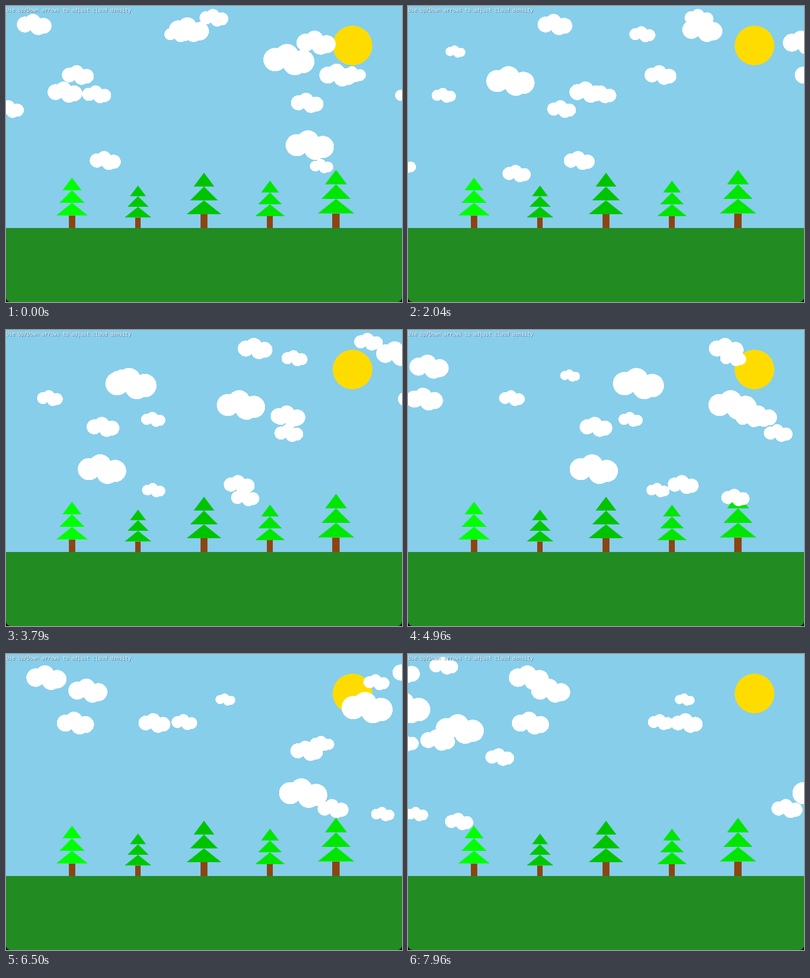
An HTML page with a canvas that plays this animation: 800 px wide and 600 px high, repeating every 8000 ms.

```html
<!DOCTYPE html>
<html lang="en">
<head>
<meta charset="utf-8">
<title>Drifting clouds</title>
<style>
  html, body { margin: 0; width: 100%; height: 100%; overflow: hidden; background: #000; }
  canvas { display: block; }
</style>
</head>
<body>
<canvas id="stage" width="800" height="600"></canvas>
<script>
const ctx = document.getElementById("stage").getContext("2d");
const LOOP = 8000, FRAME = 1000 / 24;
const WIDTH = 800, HEIGHT = 600, HORIZON = 450;
const SPAN = 1000, MARGIN = 100;

// left, top, width, pixels per tick
const clouds = [
  [22, 16, 70, 1.966],
  [329, 23, 81, 1.845],
  [320, 41, 52.5, 1.042],
  [391, 6, 58, 1.376],
  [587, 50, 79, 1.396],
  [520, 77, 103, 3],
  [633, 117, 75, 1.217],
  [675, 122, 52, 1.708],
  [113, 120, 64.5, 2.991],
  [84, 153, 70, 1.985],
  [154, 161, 58.5, 1.707],
  [-22, 191, 58, 2.486],
  [575.5, 176, 66, 2.588],
  [847, 122, 97.5, 2.55],
  [-84.7, 80, 40, 1.316],
  [786, 166, 49, 2.145],
  [565, 252, 97.5, 2.556],
  [614, 310, 47, 2.911],
  [169.3, 294, 62.5, 1.192],
  [884.6, 322, 57, 2.511]
];

// puff centres, in thirds of the puff radius
const puffs = [[0, 0], [3, -1], [5, 1], [7, 0.5]];

// layer height, leaf colour
const trees = [
  [25.5, "#00ff00"],
  [21.5, "#00c800"],
  [28, "#00c300"],
  [24, "#00e600"],
  [29.5, "#00e600"]
];

function rect(x, y, w, h, color) {
  ctx.fillStyle = color;
  ctx.fillRect(x, y, w, h);
}

// hard-edged disc, one row at a time
function disc(cx, cy, r, color) {
  ctx.fillStyle = color;
  for (let y = Math.round(cy - r); y < cy + r; y++) {
    const dy = y + 0.5 - cy;
    if (Math.abs(dy) >= r) continue;
    const half = Math.sqrt(r * r - dy * dy);
    const x = Math.round(cx - half);
    ctx.fillRect(x, y, Math.round(cx + half) - x, 1);
  }
}

function drawGround() {
  rect(0, HORIZON, WIDTH, HEIGHT - HORIZON, "#000");
  ctx.fillStyle = "#228b22";
  ctx.beginPath();
  ctx.roundRect(0, HORIZON, WIDTH, HEIGHT - HORIZON, [0, 0, 9, 9]);
  ctx.fill();
}

function drawTree([h, color], i) {
  const x = WIDTH / 6 * (i + 1);
  const left = Math.round(x - h / 4);
  const top = Math.round(HORIZON - h);
  rect(left, top, Math.round(x + h / 4) - left, HORIZON - top, "#8b4513");
  ctx.fillStyle = color;
  for (let layer = 0; layer < 3; layer++) {
    const base = HORIZON - h * (layer + 1);
    const half = h * (5 - layer) / 4;
    ctx.beginPath();
    ctx.moveTo(x - half, base);
    ctx.lineTo(x + half, base);
    ctx.lineTo(x, base - h);
    ctx.fill();
  }
}

function drawCloud([left, top, width, speed], tick) {
  const u = width / 13, r = 3 * u;
  const travelled = left + r + MARGIN + speed * tick;
  const x = (travelled % SPAN + SPAN) % SPAN - MARGIN;
  const y = top + 4 * u;
  for (const [dx, dy] of puffs) disc(x + dx * u, y + dy * u, r, "#fff");
}

function drawLabel() {
  const label = "Use Up/Down arrows to adjust cloud density";
  ctx.font = '10px "DejaVu Sans Mono", monospace';
  ctx.fillStyle = "rgba(0, 0, 0, 0.5)";
  ctx.fillText(label, 1, 13);
  ctx.fillStyle = "#fff";
  ctx.fillText(label, 0, 12);
}

// ticks run at about 60 per second, with one short stall
function tickAt(ms) {
  const frame = Math.floor((Math.floor(ms / 10) * 10 + 4.99) / FRAME);
  const tick = Math.floor(frame * 2.505);
  return tick < 370 ? tick : Math.max(370, tick - 4);
}

function draw(ms) {
  const tick = tickAt(ms);
  rect(0, 0, WIDTH, HORIZON, "#87ceeb");
  disc(700, 80, 40, "#ffdc00");
  drawGround();
  trees.forEach(drawTree);
  clouds.forEach(cloud => drawCloud(cloud, tick));
  drawLabel();
}

let start;
function loop(now) {
  start ??= now;
  draw(Math.max(0, now - start) % LOOP);
  requestAnimationFrame(loop);
}
draw(0);
requestAnimationFrame(loop);
</script>
</body>
</html>
```
